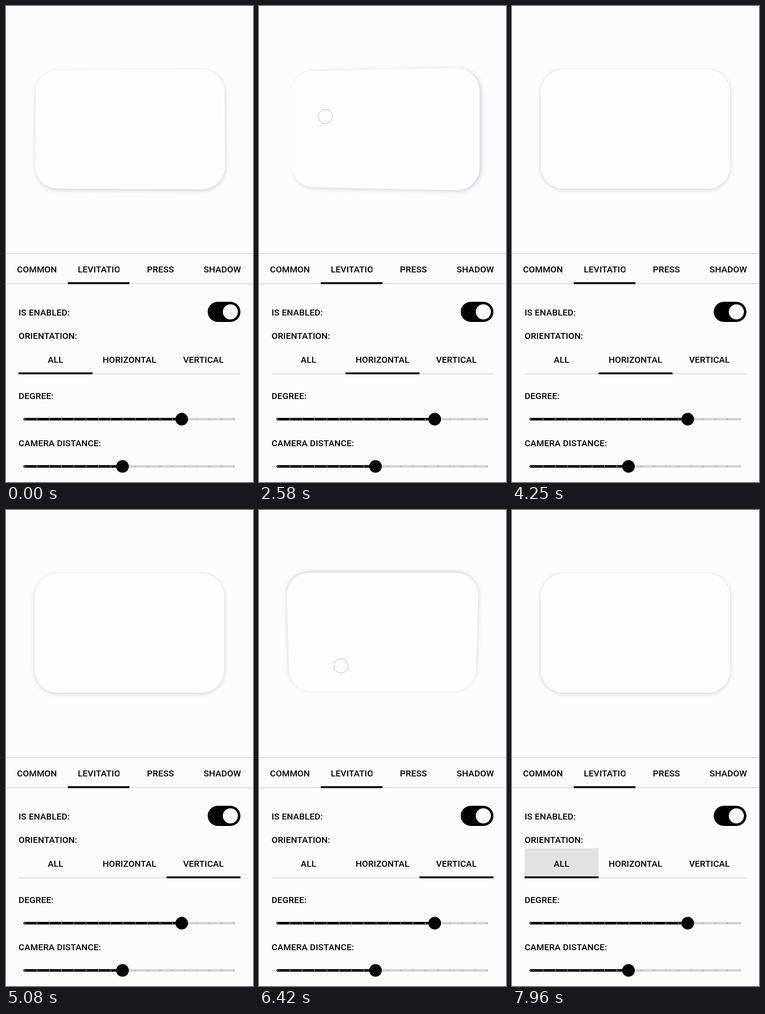
Animation of 540 by 1038 pixels, one loop 8000 ms. Source, as an HTML page:

```html
<!DOCTYPE html>
<html lang="en">
<head>
<meta charset="utf-8">
<title>Levitation settings</title>
<style>
  html, body { margin: 0; width: 100%; height: 100%; overflow: hidden; background: #fcfcfc; }
  svg { display: block; width: 100vw; height: 100vh; }
  text { font: 500 19.25px Roboto, Arial, sans-serif; letter-spacing: .007em; fill: #000; }
</style>
</head>
<body>
<svg id="stage" viewBox="0 0 540 1038">
  <defs>
    <filter id="blur" x="-20%" y="-20%" width="140%" height="140%"><feGaussianBlur stdDeviation="5"/></filter>
    <clipPath id="tabClip"><rect id="tabClipRect" y="738" width="161.67" height="65"/></clipPath>
    <clipPath id="labelClip"><rect x="157" y="555" width="91" height="40"/></clipPath>
  </defs>
  <rect width="540" height="1038" fill="#fcfcfc"/>
  <path id="shadow" fill="#aeacc0" opacity=".56" filter="url(#blur)"/>
  <path id="card" fill="#fdfdfd"/>
  <g id="panel"></g>
  <circle id="ripple" fill="#000" clip-path="url(#tabClip)"/>
  <g id="labels"></g>
  <rect id="indicator" y="799" width="161.67" height="4.125"/>
  <circle id="touch" r="15.5" fill="#fefefe" fill-opacity=".6" stroke="#d4d1df" stroke-width="1.8"/>
</svg>
<script>
const LOOP = 8000;
const DP = 1.375;
const CENTER = { x: 270, y: 268.5 };
const HALF = { w: 207, h: 130 };
const RADIUS = 36 * DP, MAX_TILT = 11 * Math.PI / 180, DEPTH = 740;
const TAB_X = 20 * DP, TAB_W = 485 / 3;
const $ = id => document.getElementById(id);

function add(parent, tag, attrs, text) {
  const el = document.createElementNS('http://www.w3.org/2000/svg', tag);
  set(el, attrs);
  if (text) el.textContent = text;
  $(parent).appendChild(el);
  return el;
}
function set(el, attrs) {
  for (const key in attrs) el.setAttribute(key, attrs[key]);
}
const clamp = v => Math.min(1, Math.max(0, v));
const smooth = v => { v = clamp(v); return v * v * (3 - 2 * v); };
const lerp = (a, b, k) => a + (b - a) * k;

function label(text, x, y, anchor = 'start') {
  return add('labels', 'text', { x, y, 'text-anchor': anchor }, text);
}
function line(x, y, width) {
  add('panel', 'rect', { x, y, width, height: DP, fill: '#cac9d4' });
}
function slider(y, value) {
  const left = 38, width = 463, height = 4 * DP;
  const track = (w, fill) =>
    add('panel', 'rect', { x: left, y: y - height / 2, width: w, height, rx: height / 2, fill });
  track(width, '#d3d2d6');
  track(value - left, '#000');
  for (let i = 0; i < 18; i++) {
    const cx = left + height / 2 + i * (width - height) / 17;
    add('panel', 'circle', { cx, cy: y, r: DP, fill: cx < value ? '#aaa' : '#a4a3aa' });
  }
  add('panel', 'circle', { cx: value, cy: y, r: 10 * DP });
}

line(0, 539.3, 540);
line(0, 604.9, 540);
line(TAB_X, 801.6, TAB_W * 3);
add('panel', 'rect', { x: 135, y: 602.3, width: 135, height: 3 * DP });
add('panel', 'rect', { x: 441, y: 645, width: 52 * DP, height: 32 * DP, rx: 16 * DP });
add('panel', 'circle', { cx: 490.5, cy: 667, r: 12 * DP, fill: '#fcfcfc' });
slider(901, 384.2);
slider(1004, 254.7);

label('COMMON', 67.7, 581, 'middle');
label('LEVITATION', 157, 581).setAttribute('clip-path', 'url(#labelClip)');
label('PRESS', 337.7, 581, 'middle');
label('SHADOW', 473, 581, 'middle');
label('IS ENABLED:', TAB_X, 674.5);
label('ORIENTATION:', TAB_X, 726);
['ALL', 'HORIZONTAL', 'VERTICAL'].forEach((name, i) =>
  label(name, TAB_X + TAB_W * (i + .5), 777.7, 'middle'));
label('DEGREE:', TAB_X, 856.7);
label('CAMERA DISTANCE:', TAB_X, 960);

const taps = [
  { at: 1420, from: 0, to: 1 },
  { at: 4480, from: 1, to: 2 },
  { at: 7560, from: 2, to: 0 }
];

// Each path point is [time, x, y]; axis limits which way the card may tilt.
const drags = [
  { axis: [1, 1], path: [[-600, 208, 229], [-230, 208, 229]] },
  { axis: [1, 0], path: [[2200, 158, 248], [2580, 145, 241], [3120, 392, 262], [3640, 150, 285], [3780, 165, 280]] },
  { axis: [0, 1], path: [[5250, 270, 215], [5630, 275, 181], [6030, 290, 350], [6420, 179, 340], [6600, 190, 315]] }
];

function pointOn(path, t) {
  const next = path.findIndex(p => p[0] > t);
  if (next === 0) return path[0].slice(1);
  if (next < 0) return path[path.length - 1].slice(1);
  const a = path[next - 1], b = path[next];
  const k = smooth((t - a[0]) / (b[0] - a[0]));
  return [lerp(a[1], b[1], k), lerp(a[2], b[2], k)];
}

function tiltAt(t) {
  let nx = 0, ny = 0;
  for (const { axis, path } of drags) {
    const [x, y] = pointOn(path, t);
    const start = path[0][0], end = path[path.length - 1][0];
    const weight = smooth((t - start) / 220) * (1 - smooth((t - end) / 400));
    nx += axis[0] * weight * (x - CENTER.x) / HALF.w;
    ny += axis[1] * weight * (y - CENTER.y) / HALF.h;
  }
  return { nx, ny };
}

function cardPath({ nx, ny }) {
  const ax = nx * MAX_TILT, ay = ny * MAX_TILT;
  const points = [];
  for (let corner = 0; corner < 4; corner++) {
    for (let i = 0; i <= 14; i++) {
      const angle = (corner + i / 14) * Math.PI / 2;
      const sx = corner === 0 || corner === 3 ? 1 : -1;
      const sy = corner < 2 ? 1 : -1;
      const x = sx * (HALF.w - RADIUS) + RADIUS * Math.cos(angle);
      const y = sy * (HALF.h - RADIUS) + RADIUS * Math.sin(angle);
      const z = x * Math.sin(ax) + y * Math.sin(ay);
      const scale = DEPTH / (DEPTH + z);
      points.push((CENTER.x + x * Math.cos(ax) * scale).toFixed(2) + ' ' +
                  (CENTER.y + y * Math.cos(ay) * scale).toFixed(2));
    }
  }
  return 'M' + points.join('L') + 'Z';
}

function drawTabs(t) {
  let slot = 0, active = null;
  for (const tap of taps) {
    if (t < tap.at) continue;
    active = tap;
    slot = lerp(tap.from, tap.to, smooth((t - tap.at - 80) / 250));
  }
  $('indicator').setAttribute('x', TAB_X + slot * TAB_W);
  const age = active ? t - active.at : Infinity;
  const left = active ? TAB_X + active.to * TAB_W : 0;
  $('tabClipRect').setAttribute('x', left);
  set($('ripple'), {
    cx: left + TAB_W / 2, cy: 771,
    r: lerp(30, 95, smooth(age / 260)),
    opacity: .1 * smooth(age / 80) * (1 - smooth((age - 420) / 200))
  });
}

function drawTouch(t) {
  let spot = null;
  for (const { path } of drags) {
    if (t >= path[0][0] && t < path[path.length - 1][0]) spot = pointOn(path, t);
  }
  for (const { at, to } of taps) {
    if (t >= at && t < at + 90) spot = [TAB_X + TAB_W * (to + .5), 771];
  }
  $('touch').setAttribute('visibility', spot ? 'visible' : 'hidden');
  if (spot) set($('touch'), { cx: spot[0], cy: spot[1] });
}

function draw(t) {
  const tilt = tiltAt(t);
  const d = cardPath(tilt);
  $('card').setAttribute('d', d);
  set($('shadow'), { d, transform: `translate(${-6 * tilt.nx} ${2 - 8 * tilt.ny})` });
  drawTabs(t);
  drawTouch(t);
}

const started = performance.now();
function tick() {
  draw((performance.now() - started) % LOOP);
  requestAnimationFrame(tick);
}
tick();
</script>
</body>
</html>
```
